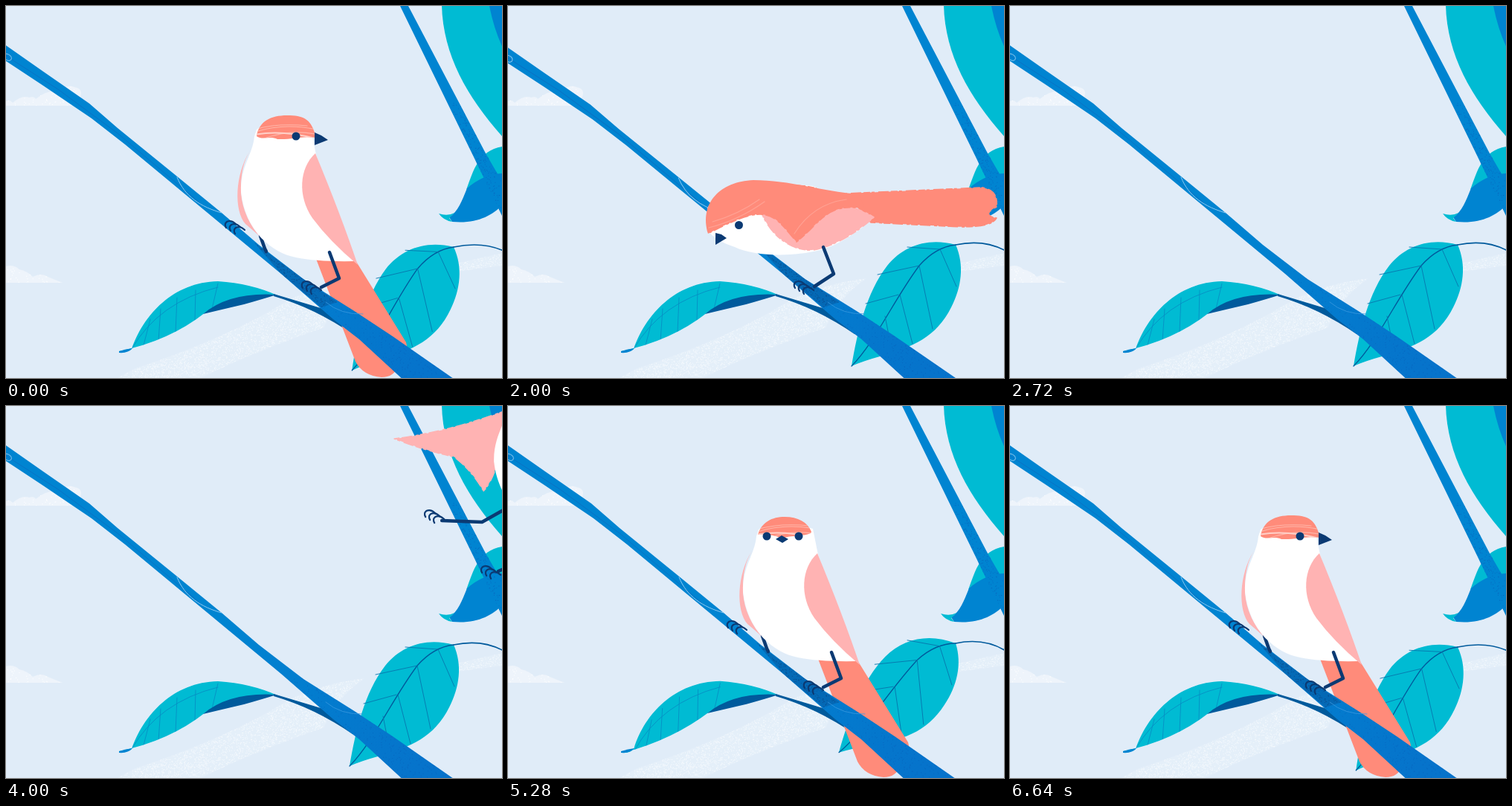
An HTML page with a canvas that plays this animation: 667 by 500 pixels, repeating every 6720 ms.

```html
<!DOCTYPE html>
<html lang="en">
<head>
<meta charset="utf-8">
<title>Bird on a branch</title>
<style>
html, body { margin: 0; width: 100%; height: 100%; overflow: hidden; background: #e0ecf8; }
canvas { display: block; }
</style>
</head>
<body>
<canvas id="stage" width="667" height="500"></canvas>
<script>
const LOOP = 6720, STEP = 80;
const SKY = '#e0ecf8', TEAL = '#00bbd3', BLUE = '#0084d1', DEEP = '#005a9c',
  NAVY = '#0b3a73', SALMON = '#ff8b7a', PINK = '#ffb3b3', WHITE = '#fff';
const stage = document.getElementById('stage');
let g = stage.getContext('2d');

// Interpolates every number in two equally built strings.
const NUM = /-?\d+(\.\d+)?/g;
const mix = (a, b, k) => {
  if (k === 0) return a;
  const to = b.match(NUM);
  let i = 0;
  return a.replace(NUM, v => (+v + (to[i++] - v) * k).toFixed(2));
};
const mixPose = (a, b, k) =>
  Object.fromEntries(Object.keys(a).map(part => [part, mix(a[part], b[part], k)]));
const shift = (path, dx, dy) => {
  let i = 0;
  return path.replace(NUM, v => +v + (i++ % 2 ? dy : dx));
};
const track = (t, ...keys) => {
  if (t <= keys[0][0]) return keys[0][1];
  for (let i = 1; i < keys.length; i++) {
    const [t0, v0] = keys[i - 1], [t1, v1] = keys[i];
    if (t < t1) {
      const u = (t - t0) / (t1 - t0);
      return v0 + (v1 - v0) * u * u * (3 - 2 * u);
    }
  }
  return keys[keys.length - 1][1];
};

const fill = (path, color) => {
  g.fillStyle = color;
  g.fill(typeof path === 'string' ? new Path2D(path) : path);
};
const line = (path, color, width = 1) => {
  g.strokeStyle = color;
  g.lineWidth = width;
  g.stroke(new Path2D(path));
};
const within = (path, draw) => {
  g.save();
  g.clip(new Path2D(path));
  draw();
  g.restore();
};
const turned = (x, y, angle, dy, draw) => {
  g.save();
  g.translate(x, y + dy);
  g.rotate(angle);
  g.translate(-x, -y);
  draw();
  g.restore();
};

let seed = 7;
const rnd = () => (seed = seed * 16807 % 2147483647) / 2147483647;
const grain = (n, x, y, w, h, size = 1) => {
  const p = new Path2D();
  for (let i = 0; i < n; i++) p.rect(x + rnd() * w, y + rnd() * h, size, size);
  return p;
};

// Scenery
const BRANCH = 'M-20 39L0 53L50 88L112 131L150 164L230 229L290 278L340 321L400 367L470 411L520 444L625 517L550 517L475 448L440 421L370 360L300 302L230 244L160 186L115 151L50 107L0 74L-20 61Z';
const SHADE = 'M334 318L400 367L446 398L424 405L370 360Z';
const LEAF = 'M462 484C470 437 482 385 510 349C532 322 565 311 602 321C614 348 610 378 596 405C576 445 545 458 500 471Q478 477 462 484Z';
const BLADE = [
  'M152 464Q164 466 169 461C185 415 225 371 285 370Q330 373 365 389Q310 385 268 412Q220 450 152 464Z',
  'M177 482Q172 470 173 452C178 400 220 368 288 367Q335 373 365 389Q325 390 292 404Q235 437 177 482Z'];
const UNDER = [
  'M265 414Q300 384 364 388Q345 394 320 401Q290 408 265 414Z',
  'M290 406Q325 385 364 388Q345 394 325 399Q310 402 290 406Z'];
const VEINS = [
  'M169 461Q205 398 285 378M185 456L194 421M205 450L208 407M228 438L230 392M254 422L255 382M277 407L285 373',
  'M178 480Q205 405 288 375M190 470L187 428M205 458L205 402M234 437L235 383M262 419L260 375M283 408L288 369'];
const branchGrain = grain(900, 380, 350, 220, 150);
const shadeGrain = grain(1300, 330, 315, 120, 95);

const scenery = document.createElement('canvas');
scenery.width = 667;
scenery.height = 500;
function paintScenery() {
  g = scenery.getContext('2d');
  g.fillStyle = SKY;
  g.fillRect(0, 0, 667, 500);
  const clouds = 'M0 134V128Q5 125 9 130Q22 119 31 123Q38 121 40 125Q55 112 70 115Q82 105 92 109Q104 111 100 122L88 134Z' +
    'M0 372V350Q10 347 18 354Q30 357 36 364Q48 358 56 364L76 372Z';
  const mist = 'M150 500L172 488Q300 445 375 398Q420 374 482 366Q440 396 428 432Q330 466 262 500Z' +
    'M606 346L667 332V349L606 357Z';
  fill(clouds, '#eef4fb');
  within(clouds, () => fill(grain(900, 0, 100, 105, 275), WHITE));
  fill(mist, '#ffffff20');
  within(mist, () => fill(grain(14000, 150, 330, 517, 170), '#ffffffa0'));

  fill('M586 0C588 66 620 122 667 175V0Z', TEAL);
  fill('M650 0Q656 30 667 54V0Z', BLUE);
  fill('M667 189C635 195 629 220 619 247Q640 228 667 226Z', TEAL);
  fill('M620 245C613 262 608 276 596 284L600 290C633 293 653 282 667 268V225Q642 226 620 245Z', BLUE);
  fill('M582 279Q594 283 603 278L596 285L600 290Q588 288 582 279Z', TEAL);
  const stem = 'M530 0H541L645 198L667 236V282L630 205Z';
  fill(stem, BLUE);
  within(stem, () => fill(grain(700, 600, 130, 67, 150), '#0b5fb8a0'));
  g = stage.getContext('2d');
}

function rightLeaf(t) {
  const angle = track(t, [0, -.02], [720, .01], [1440, -.01], [1760, 0], [2080, 0], [2240, -.07],
    [2480, .04], [2720, 0], [4320, 0], [4560, -.17], [4920, .05], [5280, .11], [5920, -.06], [6640, -.02]);
  const dy = track(t, [0, 3], [1440, 3], [1760, 0], [4320, 0], [4560, 2], [5280, -2], [5920, 3]);
  turned(602, 321, angle, dy, () => {
    fill(LEAF, TEAL);
    line('M462 484C495 450 518 396 553 349Q575 324 602 321', DEEP, 1.3);
    line('M553 349L497 361M525 388L481 400M581 327L537 324M553 349L571 434M527 388L544 454M581 327L603 377M507 417L516 462', '#0877ae', .9);
  });
  line(`M602 ${321 + dy}Q640 ${313 + dy} 669 329`, DEEP, 1.6);
}

function leftLeaf(t) {
  const bend = track(t, [2080, 0], [2240, .4], [2480, -.15], [2720, 0], [4320, 0], [4560, 1],
    [4800, -.1], [5040, .35], [5280, .12], [5600, 0]);
  const shape = pair => mix(pair[0], pair[1], bend);
  const blade = shape(BLADE);
  fill(blade, TEAL);
  within(blade, () => line(shape(VEINS), '#0790c4', .9));
  fill(shape(UNDER), DEEP);
  if (bend < .5) fill('M152 464Q162 461 170 460Q164 467 152 466Z', BLUE);
  fill('M360 387Q400 399 440 411L480 438L466 441Q415 406 360 390Z', DEEP);
}

function branch(occupied) {
  const tone = g.createLinearGradient(300, 280, 560, 490);
  tone.addColorStop(0, BLUE);
  tone.addColorStop(1, '#0673cb');
  fill(BRANCH, tone);
  within(BRANCH, () => {
    fill(branchGrain, '#0b55b070');
    line('M0 67L70 112L150 171L260 264', '#0a72c4', 1);
    if (occupied) {
      fill(SHADE, '#07579d80');
      within(SHADE, () => fill(shadeGrain, '#0b3a7390'));
    }
  });
  line('M230 230C240 256 262 270 290 278M0 64Q9 66 7 72Q4 75 0 72', '#8cc8f0', 1);
  line('M430 398Q450 415 480 414', '#3a9ae0', .8);
}

// Bird poses
const front = {
  tail: 'M417 340L470 342L538 452Q543 468 527 484Q522 499 505 499Q480 497 470 478Z',
  farWing: 'M328 195C308 225 306 275 322 293Q340 308 345 314Q318 285 316 250Q315 215 328 195Z',
  body: 'M337 166Q360 148 410 165L417 200L468 343Q420 344 390 338C358 332 322 303 316 250C315 215 332 200 334 175Z',
  wing: 'M416 198C394 218 392 256 412 285Q435 316 473 348Q450 280 416 198Z',
  cap: 'M336 173C341 156 355 149 372 149C390 149 403 156 408 169L407 171C396 176 382 173 368 178C356 172 346 173 336 173Z',
  beak: 'M360 179L368 174L377 179L369 184Z',
  eyeA: '391 175 5.5',
  eyeB: '348 175 5.5',
  leg: 'M435 331L448 366L424 378',
  foot: '411 380',
  farLeg: 'M342 309L348 326L350 330',
  farFoot: '308 299'
};
const right = { ...front,
  cap: 'M337 175C340 155 356 147 378 147C400 147 409 152 415 170L415 177C398 174 384 180 365 179C355 174 345 181 337 175Z',
  beak: 'M415 170L424 174L433 180L415 187Z',
  eyeA: '390 175 5.5',
  eyeB: '338 175 0'
};
const left = { ...front,
  beak: 'M330 170L320 174L311 180L330 187Z',
  eyeA: '405 175 0',
  eyeB: '352 175 5.5'
};
const lean = {
  tail: 'M488 291L455 252L638 244Q660 248 657 270Q636 281 657 285Q650 300 590 296Z',
  farWing: 'M330 260C320 270 320 280 330 290Q340 300 350 300Q345 290 340 280Q335 270 330 260Z',
  body: 'M268 272Q285 238 330 235L410 242L492 284Q455 318 420 328C380 338 330 336 305 324C288 318 275 312 268 300Z',
  wing: 'M340 276C355 315 390 333 416 327Q455 317 492 284Q440 250 340 276Z',
  cap: 'M269 306C257 265 285 236 330 234C380 234 420 249 472 253L480 273C430 262 420 292 388 317C355 278 350 263 269 306Z',
  beak: 'M279 305L287 307L294 312L279 321Z',
  eyeA: '330 290 0',
  eyeB: '310.5 294.5 5.5',
  leg: 'M424 324L438 360L412 377',
  foot: '398 380',
  farLeg: 'M350 300L350 305L350 310',
  farFoot: '350 295'
};
const flying = { ...lean,
  leg: 'M424 320L450 325L475 318',
  foot: '482 316'
};
const wingUp = 'M335 272C355 300 390 312 425 290Q500 210 540 118Q420 150 335 272Z';
const wingDown = 'M335 262C350 330 390 400 450 440Q470 370 455 290Q420 250 335 262Z';
const reach = Object.fromEntries(Object.entries(front).map(([part, path]) =>
  [part, part.startsWith('eye') ? path : shift(path, 70, -25)]));
Object.assign(reach, {
  farWing: 'M402 156C350 175 300 188 252 194Q300 212 332 218Q355 235 372 264Q395 240 402 156Z',
  wing: 'M486 173C470 190 500 260 530 290Q610 250 680 120Q600 110 486 173Z',
  eyeA: '461 150 5.5',
  eyeB: '418 150 5.5',
  leg: 'M462 312L440 350L392 372',
  foot: '382 375',
  farLeg: 'M430 272L370 306L316 304',
  farFoot: '306 300'
});

function birdPose(t) {
  if (t >= 4000 && t < 4480) return mixPose(front, reach, track(t, [4240, 1], [4480, 0]));
  if (t >= 4480) return mixPose(front, right, track(t, [5440, 0], [5680, 1]));
  if (t >= 2080) {
    const flap = Math.round(t / STEP) % 4 < 2 ? wingUp : wingDown;
    return mixPose(lean, { ...flying, wing: flap }, track(t, [2080, 0], [2240, 1]));
  }
  const turn = track(t, [1040, 1], [1200, 0], [1360, 0], [1520, -1]);
  const seated = turn < 0 ? mixPose(front, left, -turn) : mixPose(front, right, turn);
  return mixPose(seated, lean, track(t, [1600, 0], [1920, 1]));
}

const smear = (path, color) => {
  g.lineCap = 'butt';
  g.setLineDash([9, 2, 4, 5, 14, 3]);
  line(path, color, 1.6);
  g.setLineDash([]);
  g.lineCap = 'round';
};
const eye = spec => {
  const [x, y, r] = spec.split(' ').map(Number);
  g.fillStyle = NAVY;
  g.beginPath();
  g.arc(x, y, Math.max(r, 0), 0, 7);
  g.fill();
};
const leg = (path, foot) => {
  const [x, y] = foot.split(' ').map(Number);
  line(path, NAVY, 4.5);
  for (const i of [-1, 0, 1])
    line(`M${x + i * 6 + 7} ${y + i * 4 - 2}q-6 -6 -12 -3q-4 3 -1 8`, NAVY, 2.2);
};

function tail(pose, rough) {
  fill(pose.tail, SALMON);
  if (rough) smear(pose.tail, SALMON);
}

function bird(pose, { rough, airborne, seated }) {
  const wing = () => {
    fill(pose.wing, PINK);
    if (rough) smear(pose.wing, PINK);
  };
  leg(pose.farLeg, pose.farFoot);
  fill(pose.farWing, PINK);
  if (rough) smear(pose.farWing, PINK);
  fill(pose.body, WHITE);
  if (!airborne) wing();
  fill(pose.cap, SALMON);
  if (rough) within(pose.body, () => smear(pose.cap, SALMON));
  within(pose.cap, () => {
    if (seated) {
      line('M330 171Q370 156 418 166M334 166Q365 157 405 161M350 177Q385 165 420 173', '#ffb5a8', 1.2);
      line('M334 173Q370 166 416 178', '#ffd0c8', 2);
    } else if (rough) {
      line('M270 298Q310 288 345 263M275 290Q310 280 338 260M385 306Q410 266 455 260', '#ffa294', 1.2);
    }
  });
  if (airborne) wing();
  leg(pose.leg, pose.foot);
  fill(pose.beak, NAVY);
  eye(pose.eyeA);
  eye(pose.eyeB);
}

function render(t) {
  const visible = t < 2720 || t >= 4000;
  const leaving = t >= 2080 && t < 2720, landing = t >= 4000 && t < 4480;
  const leaning = t > 1680 && t < 2720;
  const sway = track(t, [1600, 0], [1920, -.4], [2080, -.4], [2240, .7], [2400, -.4], [2560, .2], [2720, 0],
    [4320, 0], [4400, -.5], [4560, 1], [4720, -.6], [4880, .35], [5040, -.15], [5200, 0]);
  const dx = landing ? track(t, [3840, 337], [4400, 0]) : track(t, [2080, 0], [2240, -70], [2720, -760]);
  const dy = landing ? track(t, [3840, -187], [4400, 0]) : track(t, [2080, 0], [2240, 10], [2720, -60]);
  const pose = birdPose(t);
  const rough = leaning || landing;
  const squash = rough ? 0 : sway;
  const atBird = draw => {
    if (!visible) return;
    g.save();
    if (landing || leaving) g.translate(dx, dy);
    else {
      g.translate(squash * 2, 148);
      g.scale(1, 1 + squash * .018);
      g.translate(0, -148);
    }
    draw();
    g.restore();
  };

  g.lineJoin = g.lineCap = 'round';
  g.drawImage(scenery, 0, 0);
  rightLeaf(t);
  leftLeaf(t);
  if (!leaning) atBird(() => tail(pose, rough));
  turned(440, 410, sway * .011, 0, () => branch(visible && !leaving && (!landing || t > 4320)));
  if (leaning) atBird(() => tail(pose, rough));
  atBird(() => bird(pose, { rough, airborne: leaving, seated: !rough }));
}

function tick() {
  render(Math.floor(performance.now() % LOOP / STEP) * STEP);
  requestAnimationFrame(tick);
}
paintScenery();
tick();
</script>
</body>
</html>
```
